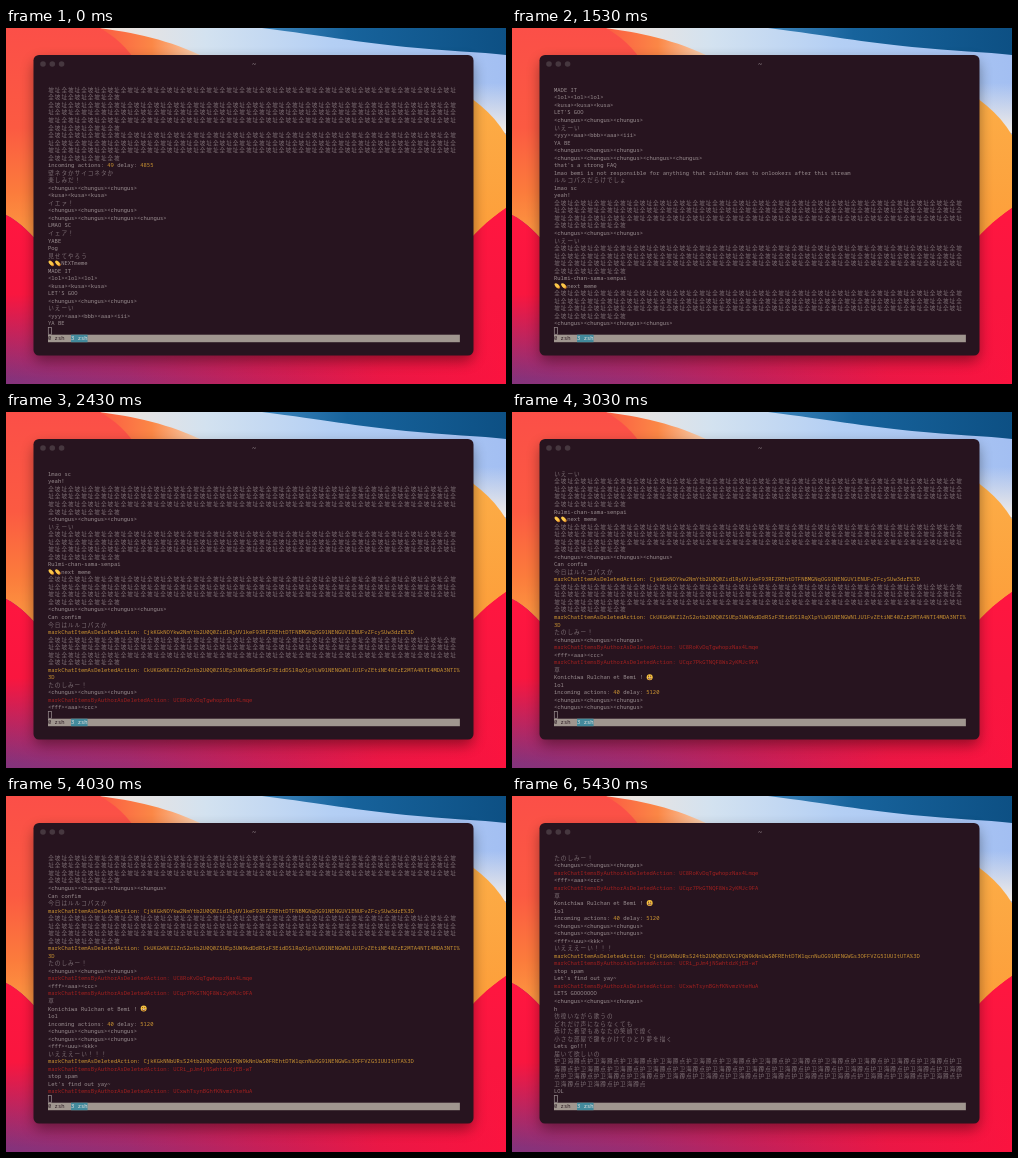
Animation of 500 by 356 pixels, one loop 5.53 s. Source, as an HTML page with a canvas:

```html
<!DOCTYPE html>
<html lang="en">
<head>
<meta charset="utf-8">
<title>Terminal chat log</title>
<style>
  html, body { margin: 0; width: 100%; height: 100%; overflow: hidden; background: #27141f; }
  svg, canvas { position: absolute; left: 0; top: 0; width: 500px; height: 356px; }
</style>
</head>
<body>
<svg viewBox="0 0 500 356">
  <defs>
    <linearGradient id="sky">
      <stop offset=".2" stop-color="#f0e4dc"/><stop offset=".4" stop-color="#d3e2f0"/>
      <stop offset=".65" stop-color="#b4cff4"/><stop offset="1" stop-color="#a3bff2"/>
    </linearGradient>
    <linearGradient id="deep">
      <stop offset="0" stop-color="#3f86bd"/><stop offset=".35" stop-color="#17639c"/>
      <stop offset="1" stop-color="#0d5084"/>
    </linearGradient>
    <linearGradient id="haze" x2="0" y2="1">
      <stop offset="0" stop-color="#f2ece6" stop-opacity="0"/><stop offset="1" stop-color="#f2ece6"/>
    </linearGradient>
    <linearGradient id="hill" x2="0" y2="1">
      <stop offset="0" stop-color="#fb4f48"/><stop offset=".45" stop-color="#fb5a42"/>
      <stop offset=".75" stop-color="#fb7c3c"/><stop offset="1" stop-color="#fd9f42"/>
    </linearGradient>
    <linearGradient id="ridge">
      <stop offset="0" stop-color="#fb5a42"/><stop offset=".5" stop-color="#fb8746"/>
      <stop offset="1" stop-color="#f8dcc2"/>
    </linearGradient>
    <linearGradient id="dune" x2="0" y2="1">
      <stop offset="0" stop-color="#fcae48"/><stop offset="1" stop-color="#fd9c38"/>
    </linearGradient>
    <linearGradient id="floor">
      <stop offset="0" stop-color="#84337c"/><stop offset=".25" stop-color="#9c2c70"/>
      <stop offset=".5" stop-color="#c42059"/><stop offset=".75" stop-color="#ea1745"/>
      <stop offset="1" stop-color="#fb133f"/>
    </linearGradient>
    <linearGradient id="glow" x2="0" y2="1">
      <stop offset="0" stop-color="#ff1640"/><stop offset=".5" stop-color="#f9163f"/>
      <stop offset="1" stop-color="#f9163f" stop-opacity="0"/>
    </linearGradient>
    <filter id="soft" x="-10%" y="-10%" width="120%" height="125%"><feGaussianBlur stdDeviation="7"/></filter>
  </defs>
  <rect width="500" height="356" fill="url(#sky)"/>
  <path d="M256 0C320 8 350 14 400 19C440 23 475 24 500 27V0Z" fill="url(#deep)"/>
  <rect x="455" y="55" width="45" height="50" fill="url(#haze)"/>
  <path d="M92 0C125 4 165 12 200 30H92Z" fill="url(#ridge)"/>
  <path d="M0 0H94C108 8 122 20 130 34V220H0Z" fill="url(#hill)"/>
  <path d="M440 56C466 68 486 84 500 107V230H440Z" fill="url(#dune)"/>
  <path d="M0 187C14 194 26 206 38 222H455C466 208 482 192 500 180V356H0Z" fill="url(#floor)"/>
  <path d="M0 187C14 194 26 206 38 222H455C466 208 482 192 500 180V352H0Z" fill="url(#glow)"/>
  <rect x="28" y="33" width="439" height="300" rx="7" opacity=".4" filter="url(#soft)"/>
  <rect x="27.5" y="27" width="440" height="300.5" rx="5.5" fill="#27141f"/>
  <g fill="#46373f"><circle cx="37" cy="36" r="2.8"/><circle cx="46.3" cy="36" r="2.8"/><circle cx="55.6" cy="36" r="2.8"/></g>
  <text x="248" y="39" text-anchor="middle" fill="#a3979b" font-size="7" font-family="'Noto Sans Mono', monospace">~</text>
</svg>
<canvas></canvas>
<script>
const LOOP = 5530, COLS = 125, ROWS = 32;
const LEFT = 42, TOP = 58.2, CELL = 3.295, LINE = 7.53;
const GRAY = '#9a8e91', GOLD = '#cb9432', RED = '#a2201f';
const NARROW = "5.49px 'Noto Sans Mono', 'DejaVu Sans Mono', monospace";
const WIDE = "5.6px 'Noto Sans CJK JP', 'Noto Sans CJK SC', 'Noto Sans CJK', sans-serif";

const chungus = n => '<chungus>'.repeat(n);
const kusa = '<kusa>'.repeat(3);
const chant = '全坡址'.repeat(66).slice(0, 197);
const hideItem = id => 'markChatItemAsDeletedAction: ' + id;
const hideAuthor = id => 'markChatItemsByAuthorAsDeletedAction: ' + id;

const history = [
  chant, chant, chant, 'incoming actions: 49 delay: 4855',
  '壁ネタかサイコネタか', '楽しみだ！', chungus(3), kusa, 'イエァ！', chungus(3), chungus(4),
  'LMAO SC', 'イェア！', 'YABE', 'Pog', '見せてやろう', '👏👏NEXTmeme', 'MADE IT',
  '<lol><lol><lol>', kusa, "LET'S GOO", chungus(3), 'いえーい', '<yyy><aaa><bbb><aaa><iii>', 'YA BE'
];
const firstBatch = [
  chungus(3), chungus(5), "that's a strong FAQ",
  'lmao bemi is not responsible for anything that rulchan does to onlookers after this stream',
  'ルルコパスだらけでしょ', 'lmao sc', 'yeah!', chant, chungus(3), 'いえーい',
  chant, 'Rulmi-chan-sama-senpai', '👏👏next meme', chant, chungus(4), 'Can confim',
  '今日はルルコパスか',
  hideItem('CjkKGkNOYkw2NmYtb2U0Q0Zid1RyUVlkeF93RFZREhtDTFNBMGNqOG9lNENGUVlENUFvZFcySUw3dzE%3D'),
  chant,
  hideItem('CkUKGkNKZlZnS2otb2U0Q0ZSUEp3UW9kdDdRSzF3EidDSlRqX1pYLW9lNENGWN1JU1FvZEtiNE40ZzE2MTA4NTI4MDA3NTI%3D'),
  'たのしみー！', chungus(3), hideAuthor('UC8RoKvDqTgwhopzNax4Lmqe'), '<fff><aaa><ccc>',
  hideAuthor('UCqz7PkGTNQF8Ws2yKMJc9FA'), '草', 'Konichiwa Rulchan et Bemi ! 😄', 'lol'
];
const secondBatch = [
  chungus(3), chungus(3), '<fff><uuu><kkk>', 'いえええーい！！！',
  hideItem('CjkKGkNNbURsS24tb2U0Q0ZUVGlPQW9kNnUwS0FREhtDTWlqcnNuOG9lNENGWGs3OFFVZG5IUUItUTA%3D'),
  hideAuthor('UCRi_pJm4jNSwhtdzKjEB-wT'), 'stop spam', "Let's find out yay~",
  hideAuthor('UCxwhTsynBGhfKNvmzVteHuA'), 'LETS GOOOOOOO', chungus(3), 'h',
  '彷徨いながら歌うの', 'どれだけ声にならなくても', '砕けた希望もあなたの笑顔で煌く',
  '小さな部屋で鍵をかけてひとり夢を描く', 'Lets go!!!', '届いて欲しいの',
  '护卫海蹲点'.repeat(40), 'LOL'
];
const feed = [...firstBatch, 'incoming actions: 40 delay: 5120', ...secondBatch];

const isWide = ch => ch.codePointAt(0) > 0x2e7f;

function colorOf(text, ch) {
  if (text.startsWith('markChatItems')) return RED;
  if (text.startsWith('markChat')) return GOLD;
  return text.startsWith('incoming') && /\d/.test(ch) ? GOLD : GRAY;
}

// Splits a message into rows of placed characters.
function wrap(text) {
  const rows = [[]];
  let col = 0;
  for (const ch of text) {
    const span = isWide(ch) ? 2 : 1;
    if (col + span > COLS) { rows.push([]); col = 0; }
    rows.at(-1).push({ ch, col, color: colorOf(text, ch) });
    col += span;
  }
  return rows;
}
const historyRows = history.map(wrap), feedRows = feed.map(wrap);

const canvas = document.querySelector('canvas');
const scale = window.devicePixelRatio || 1;
canvas.width = 500 * scale;
canvas.height = 356 * scale;
const ctx = canvas.getContext('2d');
ctx.scale(scale, scale);

function oval(x, y, rx, ry, turn, color) {
  ctx.fillStyle = color;
  ctx.beginPath();
  ctx.ellipse(x, y, rx, ry, turn, 0, 7);
  ctx.fill();
}

function drawHands(x, y) {
  oval(x + 3.7, y + 4.3, 2.9, 1.7, .75, '#d98a2b');
  oval(x + 2.8, y + 3.5, 2.8, 1.6, .75, '#fbc84a');
}

function drawFace(x, y) {
  oval(x + 3.4, y + 3.7, 3, 3, 0, '#f9c440');
  oval(x + 2.3, y + 2.8, .5, .7, 0, '#6b3f18');
  oval(x + 4.5, y + 2.8, .5, .7, 0, '#6b3f18');
  oval(x + 3.4, y + 4.9, 1.8, 1, 0, '#7a3a1c');
  oval(x + 3.4, y + 4.5, 1.5, .45, 0, '#fff');
}

function drawChar({ ch, col, color }, row) {
  const x = LEFT + col * CELL, y = TOP + row * LINE;
  if (ch === '👏') return drawHands(x, y);
  if (ch === '😄') return drawFace(x, y);
  const wide = isWide(ch);
  ctx.font = wide ? WIDE : NARROW;
  ctx.fillStyle = color;
  ctx.globalAlpha = wide ? .75 : 1;
  ctx.fillText(ch, x + (wide ? .2 : 0), y + 5.7);
  ctx.globalAlpha = 1;
}

function drawLabel(text, col, color) {
  [...text].forEach((ch, i) => drawChar({ ch, col: col + i, color }, ROWS + 1));
}

function draw(count) {
  ctx.clearRect(0, 0, 500, 356);
  const rows = [...historyRows, ...feedRows.slice(0, count)].flat().slice(-ROWS);
  rows.forEach((row, i) => row.forEach(c => drawChar(c, i)));

  ctx.strokeStyle = GRAY;
  ctx.lineWidth = .7;
  ctx.strokeRect(LEFT + .3, TOP + ROWS * LINE + .4, CELL, LINE - .8);

  const barTop = TOP + (ROWS + 1) * LINE;
  ctx.fillStyle = '#a0968f';
  ctx.fillRect(LEFT, barTop, COLS * CELL, LINE);
  ctx.fillStyle = '#438a9c';
  ctx.fillRect(LEFT + 7 * CELL, barTop, 5 * CELL, LINE);
  drawLabel('0 zsh', 0, '#2b1a22');
  drawLabel('3 zsh', 7, '#e6e2de');
}

// The screen refreshes every 100 ms but skips one refresh in five.
// Half a display frame of lead keeps refreshes from showing late.
function refreshTime(t) {
  let slot = Math.floor((t + 8 - 30) / 100);
  if (slot % 5 === 1) slot--;
  return 30 + slot * 100;
}

function arrived(t) {
  const n = firstBatch.length;
  if (t < 2747) return Math.min(n, Math.floor((t - 20) / 101) + 1);
  return n + 1 + Math.max(0, Math.floor((t - 2875) / 131) + 1);
}

const start = performance.now();
let shown = -1;
function tick() {
  const count = arrived(refreshTime((performance.now() - start) % LOOP));
  if (count !== shown) draw(shown = count);
  requestAnimationFrame(tick);
}
tick();
</script>
</body>
</html>
```
